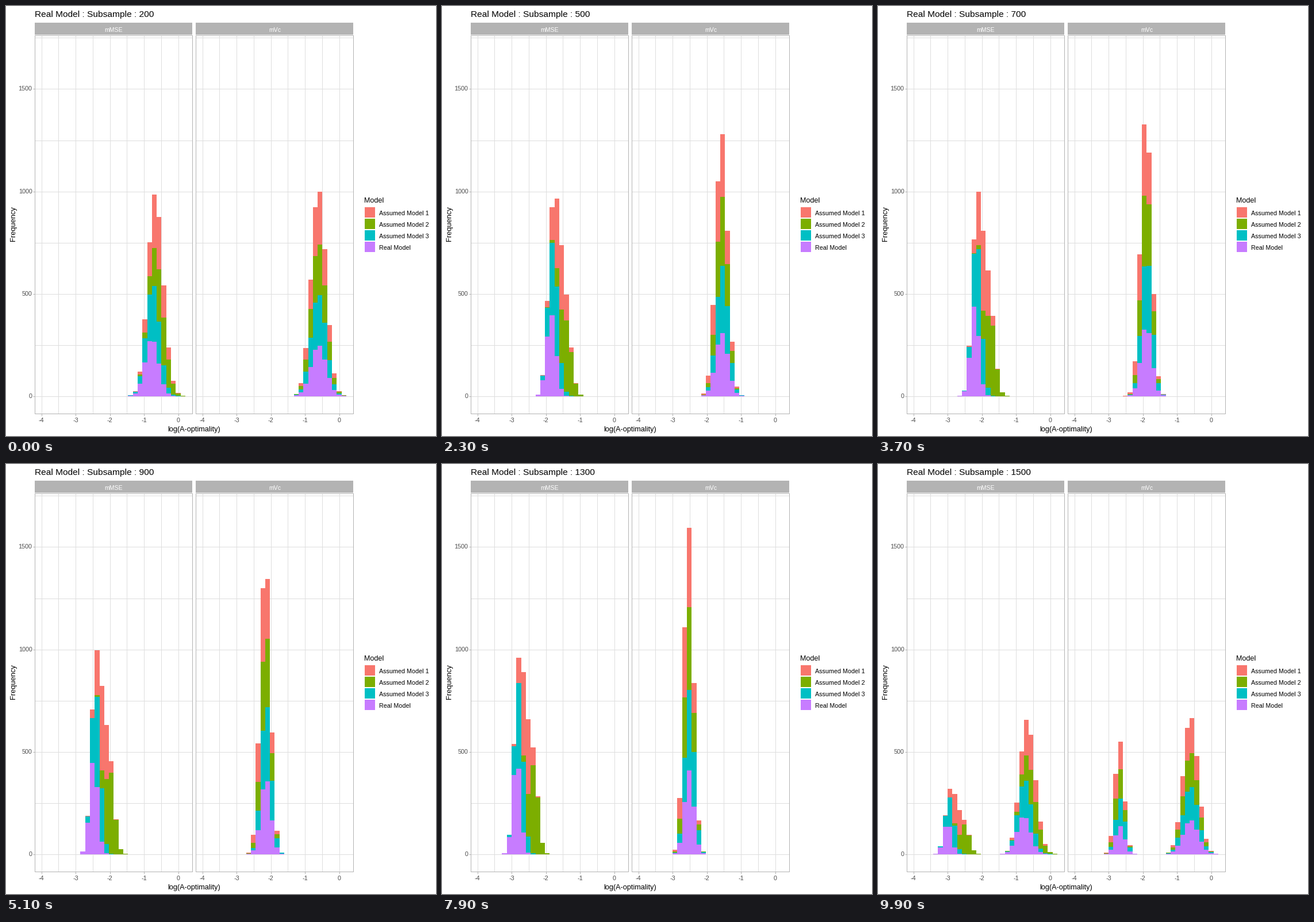
A matplotlib script that plays this animation: 748x748 px, repeating every 10000 ms.

```python
import math

import matplotlib.pyplot as plt
import numpy as np
from matplotlib.animation import FuncAnimation
from matplotlib.patches import Rectangle

SIZE, DPI = 748, 88
PT = 72 / DPI                      # points per pixel
MODELS = [("Real Model", "#C77CFF"), ("Assumed Model 3", "#00BFC4"),
          ("Assumed Model 2", "#7CAE00"), ("Assumed Model 1", "#F8766D")]
PANELS = [("mMSE", 50.5), ("mVc", 330.5)]
TOP, BOTTOM, WIDTH = 50.5, 708.5, 274
Y0, Y_UNIT = 678.5, 0.3567         # pixel row of zero, pixels per count
X0, X_UNIT, BIN = 249, 59.45, 8.3  # zero inside a panel, pixels per unit and bin
EDGES = np.arange(-28, 3) - 0.5
DRAWS = 1000                       # samples per model

# Mean and spread of each model, in bins, at four subsample sizes
KEYS = np.log([200, 500, 900, 1500])
MEANS = [
    [(-5.52, -13.20, -17.72, -21.49), (-5.12, -12.54, -16.93, -20.72),
     (-3.74, -10.13, -14.30, -17.87), (-4.54, -11.60, -15.92, -19.62)],
    [(-4.30, -11.17, -15.37, -19.11), (-4.31, -11.00, -15.22, -18.94),
     (-4.28, -11.18, -15.52, -19.25), (-4.34, -11.45, -15.74, -19.41)],
]
SPREADS = [
    [(1.38, 0.95, 0.80, 0.78), (1.42, 0.98, 0.86, 0.84),
     (1.51, 1.10, 0.92, 0.88), (1.43, 1.06, 0.92, 0.78)],
    [(1.58, 1.26, 1.02, 0.92), (1.55, 1.18, 1.04, 0.94),
     (1.57, 1.13, 1.02, 0.86), (1.48, 1.19, 1.04, 0.84)],
]


def along(keys, n):
    """Smooth curve in log(n) through the four key values."""
    return np.polyval(np.polyfit(KEYS, keys, 3), math.log(n))


def counts(mean, spread):
    """Expected histogram of normal samples."""
    cdf = [0.5 * (1 + math.erf((e - mean) / spread / math.sqrt(2))) for e in EDGES]
    return np.round(DRAWS * np.diff(cdf))


def stack(n):
    """Stacked bar tops, as panel x model x bin."""
    hists = [[counts(along(m, n), along(s, n)) for m, s in zip(ms, ss)]
             for ms, ss in zip(MEANS, SPREADS)]
    return np.cumsum(hists, axis=1)


SIZES = list(range(200, 1600, 100))
stacks = [stack(n) for n in SIZES]

# First frame and number of steps of each change
CHANGES = [(4, 4), (12, 4), (20, 4)] + [(s, 3) for s in range(28, 100, 7)]


def pose(frame):
    """Index of the current state and progress towards the next one."""
    for i, (start, steps) in enumerate(CHANGES):
        t = (frame - start + 1) / steps
        if t < 1:
            return i, max(t, 0)


fig = plt.figure(figsize=(SIZE / DPI, SIZE / DPI), dpi=DPI, facecolor="white")
ax = fig.add_axes([0, 0, 1, 1])
ax.set(xlim=(0, SIZE), ylim=(SIZE, 0))
ax.axis("off")


def line(xs, ys, color, z=1):
    """One-pixel line on whole pixels."""
    ax.plot([round(x) + 0.5 for x in xs], [round(y) + 0.5 for y in ys],
            color=color, lw=PT, zorder=z, solid_capstyle="butt")


def box(x, y, w, h, color):
    ax.add_patch(Rectangle((x, y), w, h, fc=color, ec="none", zorder=1))


def text(x, y, s, px, color="black", ha="left", **kw):
    return ax.text(x, y, s, fontsize=px * PT, color=color, ha=ha,
                   va=kw.pop("va", "baseline"), family="Liberation Sans", **kw)


GRID, EDGE, TICK = "#DEDEDE", "#B3B3B3", "#4D4D4D"
bars = []
for name, left in PANELS:
    right, zero = left + WIDTH, left + X0
    for v in range(0, 1751, 250):
        line([left, right], [Y0 - v * Y_UNIT] * 2, GRID)
    for half in range(-8, 1):
        x = zero + half / 2 * X_UNIT
        line([x, x], [TOP, BOTTOM], GRID)
        if half % 2 == 0:
            line([x, x], [BOTTOM, BOTTOM + 3], EDGE)
            text(x, 724, str(half // 2), 10.7, TICK, "center")
    # Tallest stack at the back, each lower one covers it
    bars.append([ax.stairs(np.zeros(len(EDGES) - 1), zero + EDGES * BIN, baseline=Y0,
                           fill=True, color=color, lw=0, zorder=6 - i, antialiased=False)
                 for i, (_, color) in enumerate(MODELS)])
    line([left, right, right, left, left], [TOP, TOP, BOTTOM, BOTTOM, TOP], EDGE, 8)
    box(left, 28.5, WIDTH, 21, EDGE)
    text(left + WIDTH / 2, 45, name, 10.5, "white", "center")

for v in range(0, 1501, 500):
    y = Y0 - v * Y_UNIT
    line([47, 50], [y, y], EDGE)
    text(45.5, y + 4, str(v), 10.8, TICK, "right")

text(327.5, 740, "log(A-optimality)", 12.6, ha="center")
text(13, 379, "Frequency", 12.9, ha="center", va="center", rotation=90)
text(623, 342, "Model", 12.6)
for i, (label, color) in enumerate(reversed(MODELS)):
    box(624, 350 + 20 * i, 18.5, 18, color)
    text(649, 364 + 20 * i, label, 10.75)
title = text(50, 19, "", 15.5)


def draw(frame):
    i, t = pose(frame)
    mix = (1 - t) * stacks[i] + t * stacks[(i + 1) % len(stacks)]
    for patches, tops in zip(bars, mix):
        for patch, top in zip(patches, tops):
            patch.set_data(values=Y0 - top * Y_UNIT)
    title.set_text(f"Real Model : Subsample : {SIZES[i]}")
    return [title] + sum(bars, [])


anim = FuncAnimation(fig, draw, frames=100, interval=100, repeat=True,
                     repeat_delay=0, blit=False)
plt.show()
```
